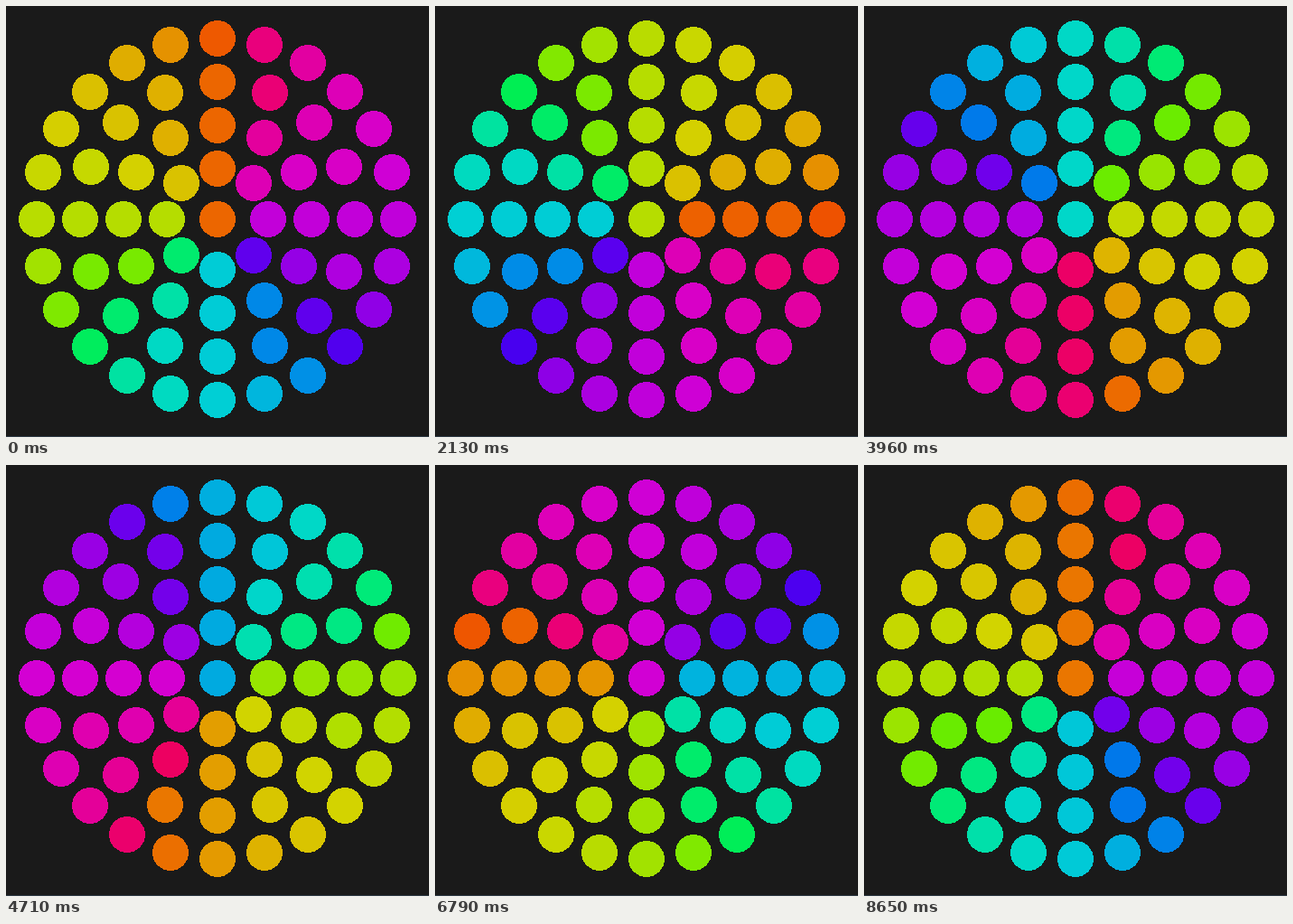
Write an HTML page that moves like this. It is 468 by 477 pixels and loops after 8.72 s.

```html
<!DOCTYPE html>
<html lang="en">
<head>
<meta charset="utf-8">
<title>Colour wheel of dots</title>
<style>
  html, body { margin: 0; width: 100%; height: 100%; overflow: hidden; background: #1a1a1a; }
  svg { display: block; }
</style>
</head>
<body>
<svg id="stage" width="468" height="477" shape-rendering="crispEdges">
  <rect y="476" width="468" height="1" fill="#2c3943"/>
</svg>
<script>
const LOOP = 8720;
const STEPS = 107;
const STEP_ANGLE = 360 / 105;
const SECTOR = 15;
const OUTER = 200;
const LAG = 2;

// [radius, number of dots]
const RINGS = [[0, 1], [56, 8], [104, 12], [152, 16], [OUTER, 24]];

// Where the wheel passes through pure red, blue and green
const RED = 4, BLUE = 138, GREEN = 228;
const ARCS = [
  { from: RED, to: BLUE, hue: 360 },
  { from: BLUE, to: GREEN, hue: 240 },
  { from: GREEN, to: RED + 360, hue: 120 }
];

const stage = document.getElementById('stage');
const mod = (a, n) => ((a % n) + n) % n;

function makeDot(radius, angle) {
  const rad = angle * Math.PI / 180;
  const el = document.createElementNS('http://www.w3.org/2000/svg', 'circle');
  el.setAttribute('cx', Math.round(234 + radius * Math.sin(rad)));
  el.setAttribute('cy', Math.round(236 - radius * Math.cos(rad)));
  el.setAttribute('r', 20);
  stage.append(el);
  // Dots between two sectors share the phase of the earlier one
  const sector = Math.floor(angle / SECTOR) * SECTOR;
  return { el, phase: sector - (radius < OUTER ? LAG : 0) };
}

const dots = RINGS.flatMap(([radius, count]) =>
  Array.from({ length: count }, (_, i) => makeDot(radius, i * 360 / count)));

// Fast near the pure colours, slow around the mixed ones
function ease(u) {
  const a = u ** 0.42, b = (1 - u) ** 0.42;
  return a / (a + b);
}

function colorAt(angle) {
  const a = RED + mod(angle - RED, 360);
  const arc = ARCS.find(({ to }) => a < to) || ARCS[2];
  const e = ease((a - arc.from) / (arc.to - arc.from));
  const mix = 1 - Math.abs(2 * e - 1);
  const peak = 242 - 31 * mix * mix;
  return `hsl(${arc.hue - 120 * e}, 100%, ${peak / 5.1}%)`;
}

function draw(time) {
  const step = Math.min(Math.floor(time / LOOP * STEPS + 0.4), STEPS - 1);
  for (const { el, phase } of dots) {
    el.setAttribute('fill', colorAt(phase - step * STEP_ANGLE));
  }
}

function tick() {
  draw(performance.now() % LOOP);
  requestAnimationFrame(tick);
}
tick();
</script>
</body>
</html>
```
